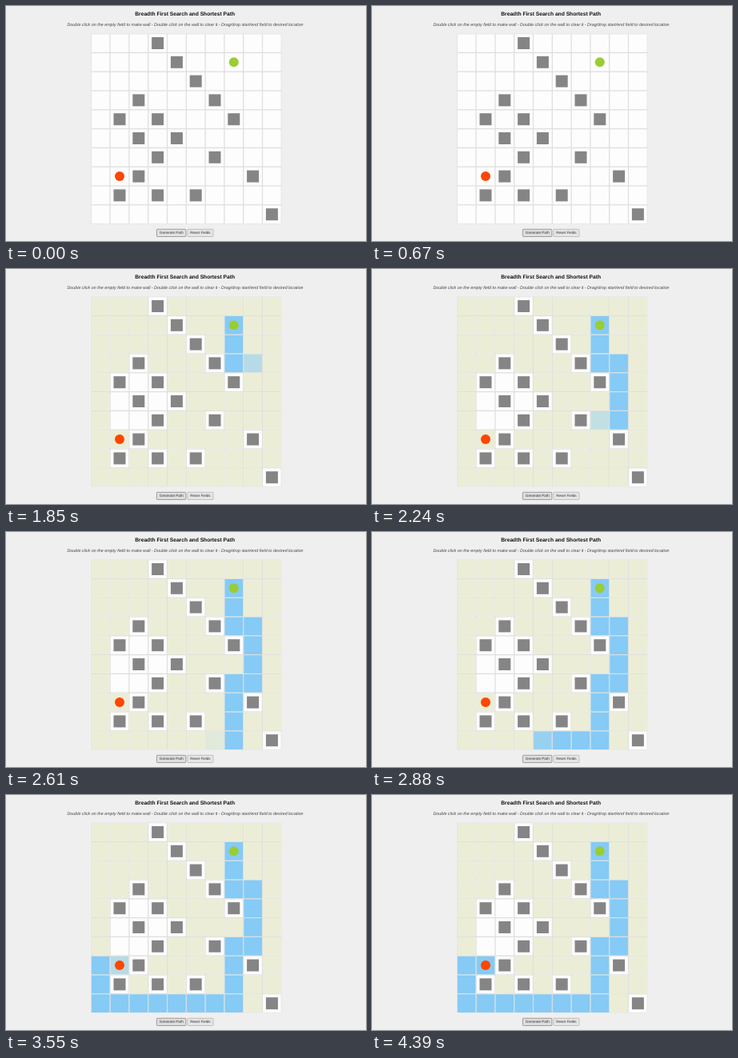
An HTML page that plays this animation: 450x294 px, repeating every 4450 ms.

```html
<!DOCTYPE html>
<html lang="en">
<head>
<meta charset="utf-8">
<title>Breadth First Search</title>
<style>
html, body { margin: 0; width: 100%; height: 100%; overflow: hidden; background: #f0eff0; }
svg { display: block; width: 450px; height: 294px; }
text { font-family: "Liberation Sans", Arial, sans-serif; text-anchor: middle; text-rendering: geometricPrecision; }
</style>
</head>
<body>
<svg viewBox="0 0 450 294">
  <text x="223.7" y="11.6" font-size="6.7" font-weight="bold" fill="#111">Breadth First Search and Shortest Path</text>
  <text x="224" y="24.9" font-size="5.37" font-style="italic" fill="#444">Double click on the empty field to make wall - Double click on the wall to clear it - Drag/drop start/end field to desired location</text>
  <rect x="106.3" y="34.6" width="238" height="237.8" fill="#dfdfdf"/>
  <g id="grid"></g>
  <rect id="run" x="188.4" y="279.3" width="36.4" height="9.2" rx=".8" stroke="#8c8c8c" stroke-width=".8"/>
  <rect x="226.8" y="279.3" width="32.2" height="9.2" rx=".8" fill="#e6e6e6" stroke="#b4b4b4" stroke-width=".8"/>
  <g font-size="4.6" fill="#333">
    <text x="206.8" y="285.4">Generate Path</text>
    <text x="242.9" y="285.4">Reset Fields</text>
  </g>
</svg>
<script>
const LOOP = 4450, FLOOD = 910, FLOOD_TIME = 500, TRACE = 1500, STEP = 100;
const PITCH = 23.8, LEFT = 106.3, TOP = 34.6;
// # wall, o enclosed empty field, S start, E end
const MAP = [
  '...#......',
  '....#..S..',
  '.....#....',
  '..#...#...',
  '.#o#...#..',
  '.o#o#.....',
  '.oo#..#...',
  '.E#.....#.',
  '.#.#.#....',
  '.........#'
];
const MOVES = 'DDRDDDLDDDLLLLLLLUUR';
const DIRS = { U: [0, -1], D: [0, 1], L: [-1, 0], R: [1, 0] };
const grid = document.getElementById('grid');
const run = document.getElementById('run');

function add(tag, attrs, parent = grid) {
  const el = document.createElementNS('http://www.w3.org/2000/svg', tag);
  for (const key in attrs) el.setAttribute(key, attrs[key]);
  return parent.appendChild(el);
}

function field(col, row, fill, size = 22.5, parent = grid) {
  const inset = (PITCH - size) / 2;
  return add('rect', {
    x: LEFT + col * PITCH + inset, y: TOP + row * PITCH + inset,
    width: size, height: size, fill
  }, parent);
}

const layers = [0, 1, 2, 3].map(() => add('g', {}));
const [base, flood, trace, marks] = layers;

MAP.forEach((line, row) => [...line].forEach((type, col) => {
  field(col, row, '#fdfdfd', 22.5, base);
  if (type === '#') field(col, row, '#858585', 15, marks);
  else if (type !== 'o') field(col, row, '#ebedd7', 22.7, flood);
  if (type === 'S' || type === 'E') add('circle', {
    cx: LEFT + (col + .5) * PITCH, cy: TOP + (row + .5) * PITCH,
    r: 6, fill: type === 'S' ? '#9acd32' : '#ff4500'
  }, marks);
}));

let col = 7, row = 1;
const path = ['', ...MOVES].map(move => {
  const [dx, dy] = DIRS[move] || [0, 0];
  return field(col += dx, row += dy, '#86caf6', 22.7, trace);
});

const ramp = (t, start, span) => Math.min(1, Math.max(0, (t - start) / span));

function draw() {
  const t = performance.now() % LOOP;
  flood.setAttribute('opacity', ramp(t, FLOOD, FLOOD_TIME));
  path.forEach((el, i) => el.setAttribute('opacity', ramp(t, TRACE + i * STEP, STEP)));
  run.setAttribute('fill', t < 670 ? '#e2e2e2' : '#dedede');
  requestAnimationFrame(draw);
}
draw();
</script>
</body>
</html>
```
